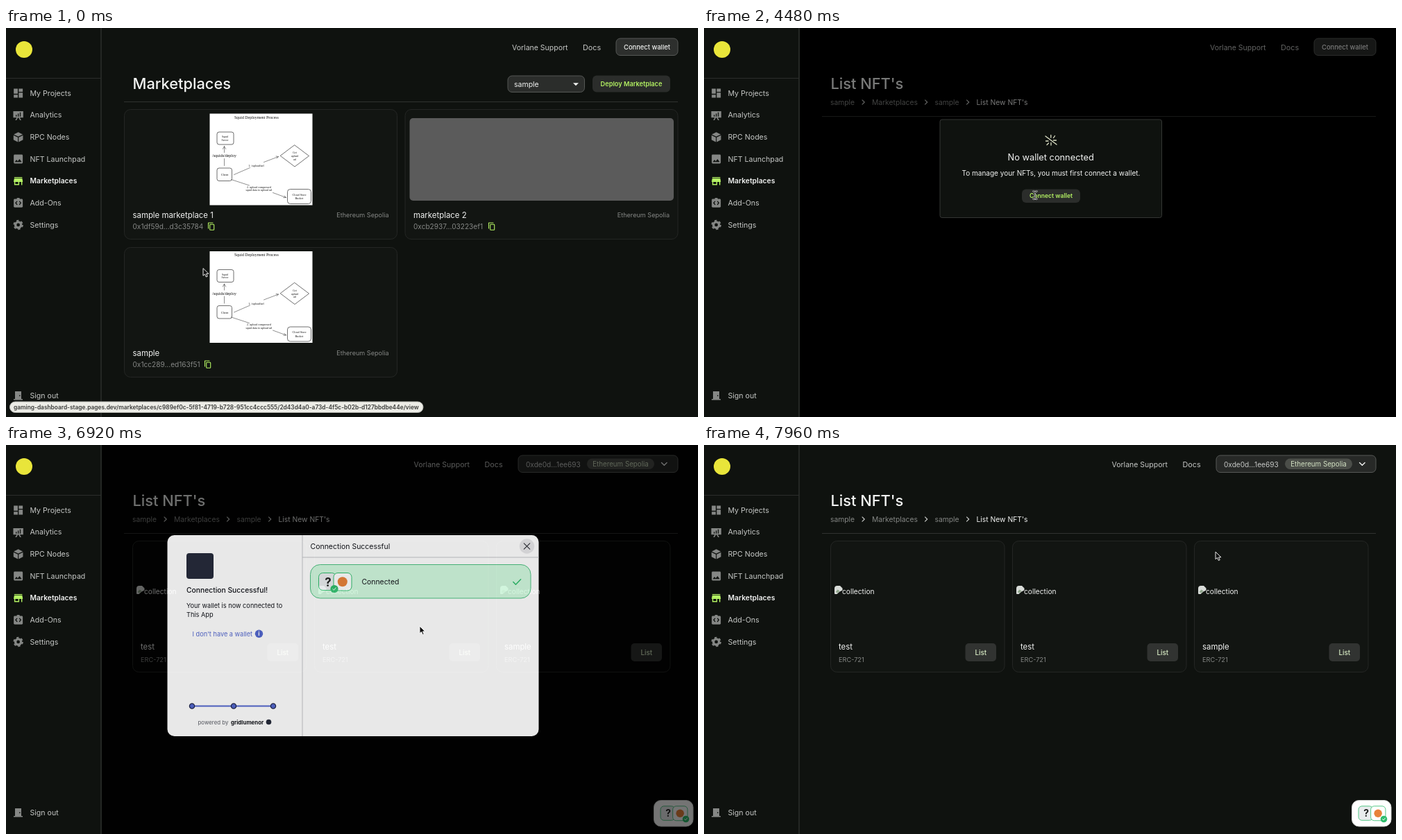
An HTML page for the animation above (8 s loop, 997x561 px).

```html
<!DOCTYPE html>
<html lang="en">
<head>
<meta charset="utf-8">
<title>Marketplace dashboard</title>
<style>
html, body { margin: 0; width: 100%; height: 100%; overflow: hidden; background: #0f120f; }
svg { display: block; width: 100vw; height: 100vh; font-family: Inter, "Open Sans", sans-serif; }
.serif { font-family: "Liberation Serif", "Noto Serif", serif; }
</style>
</head>
<body>
<svg id="stage" viewBox="0 0 997 561"></svg>
<script>
const LIME = '#b4f263', WHITE = '#f2f3f2', GREY = '#858785', SOFT = '#c6c8c6', LINK = '#5468cf', INK = '#14161c', GREEN = '#2fbd6c';

// Text is placed by the vertical middle of its capitals.
const text = (x, y, size, str, fill = WHITE, weight = 400, anchor = 'start') =>
  `<text x="${x}" y="${y + size * .36}" font-size="${size}" fill="${fill}" font-weight="${weight}" text-anchor="${anchor}">${str}</text>`;
const mid = (x, y, size, str, fill, weight) => text(x, y, size, str, fill, weight, 'middle');
const end = (x, y, size, str, fill, weight) => text(x, y, size, str, fill, weight, 'end');
const box = (x, y, w, h, r, fill, stroke = 'none', sw = 1) =>
  `<rect x="${x}" y="${y}" width="${w}" height="${h}" rx="${r}" fill="${fill}" stroke="${stroke}" stroke-width="${sw}"/>`;
const path = (d, stroke, sw = 1, fill = 'none') =>
  `<path d="${d}" stroke="${stroke}" stroke-width="${sw}" fill="${fill}" stroke-linecap="round" stroke-linejoin="round"/>`;
const shape = (d, fill) => `<path d="${d}" fill="${fill}" fill-rule="evenodd"/>`;
const dot = (x, y, r, fill, stroke = 'none', sw = 1) =>
  `<circle cx="${x}" cy="${y}" r="${r}" fill="${fill}" stroke="${stroke}" stroke-width="${sw}"/>`;
const group = (id, body) => `<g id="${id}">${body}</g>`;
const at = (x, y, body, scale = 1) => `<g transform="translate(${x} ${y}) scale(${scale})">${body}</g>`;

function diagram(x, y) {
  const label = (x, y, size, str) => mid(x, y, size, str, '#111');
  return at(x, y, `<g class="serif">` +
    box(0, 0, 148, 132, 0, '#fff') +
    label(67.5, 5, 5.9, 'Squid Deployment Process') +
    box(10.5, 26.5, 24, 18, 3, '#fff', '#333', .7) + label(22, 33.5, 3.8, 'Squid') + label(22, 38, 3.8, 'Server') +
    path('M21 75V65M21 56V47M18.8 51L21 47L23.2 51', '#444', .6) + label(21, 60.5, 6, '/squids/deploy') +
    box(10.5, 78.5, 21.5, 18.5, 3, '#fff', '#333', .7) + label(21.5, 88, 4.4, 'Client') +
    path('M35 88L58 78M78 70L99 62M95.6 61.4L99 62L96.6 64.6', '#444', .6) + label(67, 75, 4.2, '1. /upload/url') +
    path('M122.5 45.5L143 61L122.5 76.5L102 61Z', '#333', .7) +
    ['Get', 'upload', 'url'].map((s, i) => label(122.5, 56.5 + i * 4.7, 3.8, s)).join('') +
    path('M31 95L57 103.5M91 114L110 121M106.4 121.2L110 121L107.6 118.4', '#444', .6) +
    label(71, 106, 4, '2. upload compressed') + label(71, 110.2, 4, 'squid data to upload url') +
    box(112, 109, 34, 21, 4, '#fff', '#333', .7) + label(129, 116.5, 4.2, 'Cloud Store') + label(129, 122, 4.2, 'Bucket') +
    `</g>`);
}

const card = (x, y, w, h) => box(x + .5, y + .5, w, h, 9, '#ffffff03', '#242624');
const rule = y => box(170, y, 798, 1, 0, '#303230');
const copyIcon = (x, y) => path(`M${x} ${y + 8}V${y}H${x + 6.5}`, LIME, 1.1) + box(x + 2.2, y + 2.2, 6, 8, .8, 'none', LIME, 1.1);
const button = (x, y, w, h, str, size) =>
  box(x, y, w, h, 6, '#2b2d2b') + mid(x + w / 2, y + h / 2, size, str, LIME, 600);

function market(x, y, name, hash, copyX, picture) {
  return card(x, y, 393, 187) + picture +
    text(x + 12.5, y + 152.5, 11.4, name) + end(x + 381.5, y + 152.5, 9.1, 'Ethereum Sepolia', GREY) +
    text(x + 12.5, y + 169.5, 10.1, hash, GREY) + copyIcon(copyX, y + 164);
}

function crumbs(...names) {
  const xs = [182, 242, 332.5, 392.5], arrows = [228, 318.5, 378.5];
  return names.map((n, i) => {
    const last = i === names.length - 1;
    return text(xs[i], 107, 10.3, n, last ? WHITE : GREY) +
      (last ? '' : path(`M${arrows[i]} 103.8l3.2 3.2l-3.2 3.2`, SOFT, 1.2));
  }).join('');
}

const title = str => text(182.5, 80, 21.8, str, WHITE, 500);

const listPage = title('Marketplaces') +
  box(723, 69, 110.5, 23.5, 6, '#2b2d2b', '#555755') + text(732, 81, 10.5, 'sample') +
  shape('M817 79.3h8l-4 4z', WHITE) +
  button(845, 68.5, 112, 24, 'Deploy Marketplace', 9.2) + rule(106) +
  market(170, 117, 'sample marketplace 1', '0x1df59d...d3c35784', 291.5, diagram(293.5, 123.5)) +
  market(574.5, 117, 'marketplace 2', '0xcb2937...03223ef1', 695.5, box(581.5, 130, 380.5, 119, 5, '#5b5b5b')) +
  market(170, 316, 'sample', '0x1cc289...ed163f51', 286.5, diagram(293.5, 322));

const itemPage = title('sample') + crumbs('sample', 'Marketplaces', 'Marketplace NFTs') +
  button(874, 79, 83, 24.5, 'List New NFT', 9.2) + rule(127) +
  group('item', card(182, 138, 250.5, 189) + diagram(233.5, 145) + text(194, 291, 11.5, 'ohm test') +
    end(421, 290, 10, 'Item Id: 0', GREY) + text(194, 309.5, 9.3, '100.0 ETH', GREY));

const brokenImage = (x, y) =>
  shape(`M${x} ${y + 4}q0-4 4-4h4l3.5 3.5v3l-4 2l-4 3.5h-2.5q-1 0-1-1z`, '#d9dcd9') +
  shape(`M${x + 1.5} ${y + 9}l3-3.5l3 2l-3 3z`, '#8fa58b');

const nftCard = (x, name) => card(x, 138, 250.5, 189) + brokenImage(x + 6, 203) +
  text(x + 17, 211, 10.2, 'collection') + text(x + 12, 291, 11.4, name) + text(x + 12, 309.5, 9.2, 'ERC-721', GREY) +
  box(x + 194.5, 286, 44.5, 26, 5, '#313331') + mid(x + 216.7, 299, 9.8, 'List', '#dcf0c8', 500);

const newPage = title("List NFT's") + crumbs('sample', 'Marketplaces', 'sample', "List New NFT's") + rule(127) +
  group('cards', nftCard(182, 'test') + nftCard(444, 'test') + nftCard(706, 'sample'));

const links = (a, b) => text(a, 28, 10.5, 'Vorlane Support', SOFT) + text(b, 28, 10.8, 'Docs', SOFT);
const header =
  group('offline', links(729, 831) + box(879, 15, 89, 24.5, 6, '#2d2f2d', '#565856') + mid(923.5, 27.5, 9.4, 'Connect wallet', WHITE, 500)) +
  group('online', links(587.5, 689.5) + box(738, 15, 230, 24.5, 6, '#272927', '#565856') +
    text(749, 28, 10.1, '0xde0d...1ee693', SOFT) + box(837, 19.5, 97, 15.5, 7.7, '#4b4e49') +
    mid(885.5, 27.3, 9.75, 'Ethereum Sepolia', '#d3e2c3') + path('M944.5 25.5l3.8 3.8l3.8-3.8', WHITE, 1.4));

const dialog = group('paper', box(340, 132, 319.5, 141.5, 3, '#0f120f', '#343634')) +
  path('M492 156L508 168M499.8 154.5V158M505.5 155.5L503.5 158.5M503.5 162H507.5M492.5 163H496M496.5 166L494 168.5M500 165.5V169', '#dfe3c8', 1.3) +
  mid(499.7, 186, 12.8, 'No wallet connected') +
  mid(500, 209, 10, 'To manage your NFTs, you must first connect a wallet.') +
  button(458, 232.5, 84, 19.5, 'Connect wallet', 8.6);

// The pair of linked icons used in the modal and in the corner.
const pair = (x, y, s) => at(x, y,
  box(0, 0, 25, 25, 6, '#e9ecee', GREEN, 1) + mid(13.5, 13, 17, '?', '#222', 700) +
  box(21.5, 0, 26, 25.5, 6, '#fff', GREEN, 1) + dot(34.3, 12.8, 7, '#e8823a'), s);
const badge = (x, y, r) => dot(x, y, r, GREEN) + path(`M${x - r * .4} ${y}l${r * .3} ${r * .3}l${r * .5} ${-r * .6}`, '#fff', 1);
const widget = box(933.5, 512.5, 56.5, 37.5, 10, '#fff', '#d5d8d5') + pair(943, 520.8, .82) + badge(979.5, 539.5, 4.8);

const info = (x, y, r, fill) => dot(x, y, r, fill) + mid(x, y, r * 1.5, 'i', '#fff', 700);
const noWallet = y => text(268.5, y, 9.2, "I don't have a wallet", LINK) + info(364.5, y, 5.7, LINK);
const lines = (y, arr) => arr.map((s, i) => text(260, y + i * 13.3, 9.2, s, INK)).join('');
const wallet = (x, name, color) => box(x, 172.5, 155.5, 54.5, 15, '#fff', '#9a9ca3') +
  box(x + 12, 183.5, 32.5, 32.5, 8, '#fff', '#c9cbd0') + dot(x + 28.3, 199.8, 8.5, color) + text(x + 56, 200, 10.4, name, INK, 500);

const chooser = text(260, 209, 10.3, 'Connect your wallet', INK, 500) +
  lines(231.5, ['Connecting your wallet is like', '“logging in” to Web3. Select', 'your wallet from the options to', 'get started.']) + noWallet(298.5) +
  path('M267 376.5H388', INK, 1.6) + dot(267, 376.5, 3.6, LINK, INK, 1.3) + dot(328.3, 376.5, 3, INK) + dot(388, 376.5, 3, INK) +
  text(438.5, 146, 10.5, 'Available Wallets (2)', INK) +
  wallet(438.5, 'PeltaBox', '#e8a53a') + wallet(600.5, 'SatchelBridge', '#6f8fe8') +
  box(438.5, 232.5, 317.5, 37.5, 7, '#f8e2a2', '#d0a530') +
  text(447.5, 246, 8.1, "Why don't I see my wallet?", '#574a18') + text(447.5, 256.5, 8, 'Click here to learn more', LINK) +
  info(741.5, 245.5, 5, '#574a18');

const success = text(260, 209, 10.3, 'Connection Successful!', INK, 500) +
  lines(231.5, ['Your wallet is now connected to', 'This App']) + noWallet(272.3) +
  path('M268 376.5H385', LINK, 1.8) + [268, 328, 385].map(x => dot(x, 376.5, 3.6, LINK, '#20264a', 1.3)).join('') +
  text(438.5, 146, 10.5, 'Connection Successful', INK) +
  box(438.5, 172.5, 317.5, 48.5, 14, '#d1f8de', '#4dc081') + pair(450.5, 184.5, 1) + badge(473, 207.5, 5.6) +
  text(512.5, 197, 10.4, 'Connected', INK) + path('M730.8 197.5l3.6 3.7l7.2-7.4', GREEN, 1.5);

const modal = box(138, 0, 859, 561, 0, 'rgba(0,0,0,.6)') + box(232.5, 130, 535, 290, 10, '#fff') +
  box(426.5, 130, 1, 290, 0, '#c4c6ca') + box(427, 161.5, 340.5, 1, 0, '#c4c6ca') +
  dot(750.5, 146, 10.7, '#e7e7e9') + path('M746.3 141.8l8.4 8.4M754.7 141.8l-8.4 8.4', '#33353c', 1.2) +
  box(260, 156, 39, 37, 4, '#262b3b') +
  text(276.5, 400, 7.9, 'powered by', '#5c5f68') + text(324, 400, 7.9, 'gridlumenor', INK, 700) + dot(378.5, 399.5, 3.8, '#262b3b') +
  group('chooser', chooser) + group('success', success);

// Menu icons live in a 24-unit square.
const code = 'M9.5 9L6.8 12L9.5 15M14.5 9L17.2 12L14.5 15';
const menu = [
  ['My Projects', shape('M3 13h8V3H3zM3 21h8v-6H3zM13 21h8V11h-8zM13 3v6h8V3z', GREY)],
  ['Analytics', shape('M2 4h20v13h-7l3 5h-2.5l-3-5h-1l-3 5H6l3-5H2z', GREY) + path('M8 14v-2M12 14V9.5M16 14V7', '#0f120f', 1.8)],
  ['RPC Nodes', shape('M12 2L21 6.5L12 11L3 6.5zM2.5 8.3L11.2 12.6V22L2.5 17.5zM21.5 8.3L12.8 12.6V22L21.5 17.5z', GREY)],
  ['NFT Launchpad', shape('M3 5q0-2 2-2h14q2 0 2 2v14q0 2-2 2H5q-2 0-2-2zM8.5 13.5L5 18h14l-4.5-6l-3.5 4.5z', GREY)],
  ['Marketplaces', shape('M4 4h16v2H4zM21 14v-2l-1-5H4l-1 5v2h1v6h10v-6h4v6h2v-6zM12 18H6v-4h6z', LIME)],
  ['Add-Ons', box(3, 4, 18, 17, 2, GREY) + box(9, 2, 6, 4, 1.5, GREY) + path(code, '#0f120f', 1.8)],
  ['Settings', dot(12, 12, 5.6, 'none', GREY, 4.6) +
    `<circle cx="12" cy="12" r="8.6" fill="none" stroke="${GREY}" stroke-width="2.8" stroke-dasharray="4.5 4.506"/>`]
];
const sidebar = box(0, 0, 137, 561, 0, '#0f120f') + box(136.5, 0, 1, 561, 0, '#3a3c3a') + box(0, 72, 137, 1, 0, '#2b2d2b') +
  dot(26, 31, 12, '#e9e53a') +
  menu.map(([name, icon], i) => {
    const y = 94 + i * 31.65, on = i === 4;
    return at(9, y - 8.6, icon, .72) + text(34.5, y, on ? 10.3 : 10.6, name, on ? WHITE : SOFT, on ? 600 : 400);
  }).join('') +
  shape('M13 524h9v11h2v1.5H11V535h2zM19 529.5v1.5h1.5v-1.5z', GREY) + text(34.5, 530, 10.6, 'Sign out', SOFT);

const status = box(5.5, 539, 595.5, 15.5, 7.7, '#ecece6', '#b9bab4') +
  text(11, 547, 8.35, 'gaming-dashboard-stage.pages.dev/marketplaces/c989ef0c-5f81-4719-b728-951cc4ccc555/2d43d4a0-a73d-4f5c-b02b-d127bbdbe44e/view', '#3b3c3a', 600);

const arrow = path('M0 0V10.2L2.5 8L4.3 12L6.2 11.2L4.5 7.4H7.6Z', '#fff', .9, '#111');
const beamPath = 'M-2.5-5.5Q0-5.5 0-4V4Q0 5.5-2.5 5.5M2.5-5.5Q0-5.5 0-4M0 4Q0 5.5 2.5 5.5';
const beam = path(beamPath, '#fff', 2.2) + path(beamPath, '#111', 1);

const shade = box(138, 0, 859, 561, 0, '#000');
const stage = document.getElementById('stage');
stage.innerHTML = box(0, 0, 997, 561, 0, '#0f120f') + group('night', shade) +
  group('listPage', listPage) + group('itemPage', itemPage) + group('newPage', newPage) + header +
  group('veil', shade) + group('dialog', dialog) + group('widget', widget) + group('modal', modal) +
  sidebar + group('status', status) + group('cursor', group('arrow', arrow) + group('beam', beam));

const el = {};
stage.querySelectorAll('[id]').forEach(n => el[n.id] = n);
const show = (id, on) => el[id].setAttribute('opacity', +on);
const ramp = (t, from, len) => Math.min(1, Math.max(0, (t - from) / len));
const ease = u => u * u * (3 - 2 * u);

// Pointer stops: time, x, y
const stops = [[520, 284, 347], [1320, 318, 392], [2160, 330, 380], [2740, 406, 322.5], [2780, 406, 322.5], [3260, 906, 92],
  [3440, 906, 92], [3860, 516, 231], [4200, 477, 241], [4900, 477, 241], [5220, 513, 201], [6080, 513, 201],
  [6860, 596, 261.5], [7680, 596, 261.5], [7960, 737, 154.5]];

function pointer(t) {
  const i = stops.findIndex(s => s[0] > t);
  if (i < 0) return stops[stops.length - 1].slice(1);
  const b = stops[i], a = stops[i - 1] || b, u = ease(ramp(t, a[0], b[0] - a[0] || 1));
  return [a[1] + (b[1] - a[1]) * u, a[2] + (b[2] - a[2]) * u];
}

function draw(t) {
  const fade = ramp(t, 4490, 400) - ramp(t, 6885, 400);
  const opening = ease(ramp(t, 3520, 225));
  const veil = opening - ease(ramp(t, 4700, 225));
  const linked = t >= 5440, overText = t >= 4160 && t < 6200;
  show('listPage', t < 1700);
  show('itemPage', t >= 1700 && t < 3400);
  show('item', t >= 2000);
  show('newPage', t >= 3400);
  show('cards', t >= 6300);
  show('offline', !linked);
  show('online', linked);
  show('widget', linked);
  show('chooser', !linked);
  show('success', linked);
  show('night', Math.max(veil, fade * fade));
  show('veil', veil * .5);
  show('dialog', t < 4890 ? opening : 0);
  show('paper', 1 - fade);
  show('modal', fade);
  show('status', 1 - ramp(t, 2280, 160));
  show('arrow', !overText);
  show('beam', overText);
  el.cursor.setAttribute('transform', `translate(${pointer(t)})`);
}

const start = performance.now();
function tick() {
  draw((performance.now() - start) % 8000);
  requestAnimationFrame(tick);
}
tick();
</script>
</body>
</html>
```
